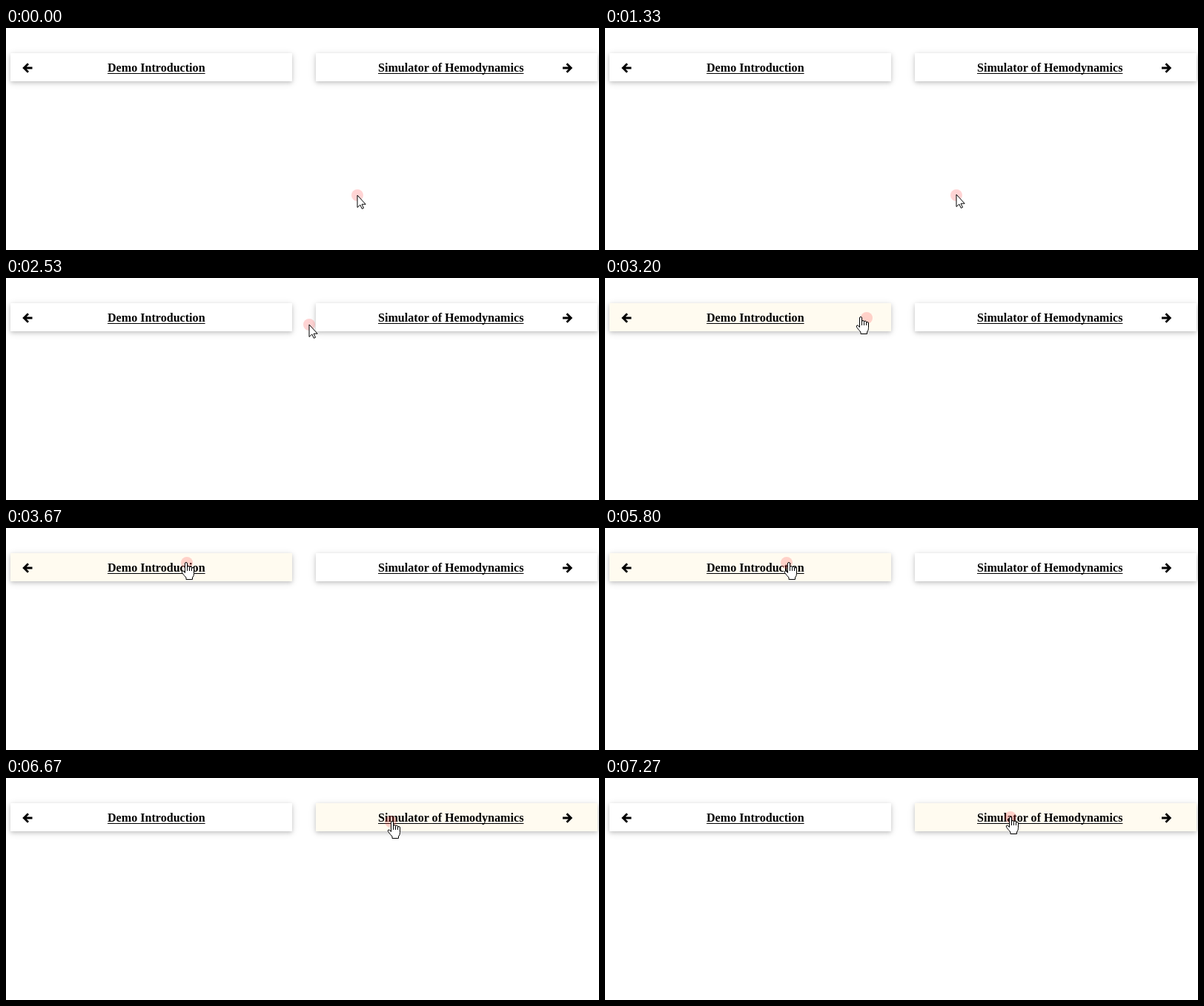
An HTML page that plays this animation: 800 px wide and 300 px high, repeating every 8 s.

```html
<!DOCTYPE html>
<html lang="en">
<head>
<meta charset="utf-8">
<title>Page navigation</title>
<style>
  html, body { margin: 0; width: 100%; height: 100%; overflow: hidden; background: #fff; }
  .card {
    position: absolute; top: 34px; width: 380px; height: 38px;
    background: #fff;
    box-shadow: 0 2px 5px rgba(0,0,0,.16), 0 2px 10px rgba(0,0,0,.12);
  }
  .card.hover { background: #fffbf0; }
  .card span {
    position: absolute; white-space: nowrap;
    font: bold 16.1px/40px "Liberation Serif", serif;
    text-decoration: underline 1px; text-underline-offset: 2px;
    text-decoration-skip-ink: none;
  }
  svg { position: absolute; left: 0; top: 0; }
  .icon { fill: none; stroke: #000; stroke-width: 2.8; }
  .pointer { fill: #fff; stroke: #000; stroke-linejoin: round; }
</style>
</head>
<body>
<div class="card" style="left:6px"><span style="left:131px">Demo Introduction</span></div>
<div class="card" style="left:418px"><span style="left:84px">Simulator of Hemodynamics</span></div>
<svg width="800" height="300">
  <defs><path id="back" d="M30 48.2L24.2 54L30 59.8M25 54H35.5"/></defs>
  <use href="#back" class="icon"/>
  <use href="#back" class="icon" transform="matrix(-1 0 0 1 786.5 0)"/>
  <circle id="halo" r="8" fill="rgba(255,60,60,.22)"/>
  <g id="cursor" class="pointer">
    <path id="arrow" d="M0 0V16.5L3.8 13L6.3 18.3L8.5 17.3L6.1 12.2H11.2Z"/>
    <g id="hand">
      <path d="M-1.5 13.5V1a1.5 1.5 0 0 1 3 0V6a1.5 1.5 0 0 1 3 0V6.6a1.5 1.5 0 0 1 3 0V8a1.5 1.5 0 0 1 3 0V14.5Q10.5 18 8.5 20V22.5H0V20Q-2 18-5.5 13.5Q-6.5 11-4 10.8Z"/>
      <path d="M1.5 6V11M4.5 7V11M7.5 8V11" fill="none"/>
    </g>
  </g>
</svg>
<script>
const LOOP = 8000, STEP = 1000 / 15;
const HALO_LAG = 27, HOVER_LAG = 100;

// time, x, y of the pointer
const path = [
  [0, 474, 226], [1267, 474, 226], [1333, 474, 225], [2133, 412, 80],
  [2533, 409, 63], [2600, 409, 63], [2733, 406.5, 57], [2867, 406.5, 57],
  [3667, 243, 47], [5733, 243, 47], [5800, 248, 47], [6200, 409.5, 51],
  [6600, 516, 59], [7267, 547, 53], [LOOP, 547, 53]
];
const $ = id => document.getElementById(id);
const cards = document.querySelectorAll('.card');

function slope(i, axis) {
  const a = path[i], b = path[i + 1];
  return a && b ? (b[axis] - a[axis]) / (b[0] - a[0]) : 0;
}

// Harmonic mean keeps the curve monotone and stops it at rests
function tangent(i, axis) {
  const a = slope(i - 1, axis), b = slope(i, axis);
  return a * b > 0 ? 2 * a * b / (a + b) : 0;
}

function pointAt(time) {
  const t = Math.max(0, time);
  const i = path.findIndex((p, k) => k === path.length - 2 || t < path[k + 1][0]);
  const a = path[i], b = path[i + 1], span = b[0] - a[0], u = (t - a[0]) / span;
  return [1, 2].map(axis =>
    a[axis] + (b[axis] - a[axis]) * u * u * (3 - 2 * u) +
    span * u * (1 - u) * (tangent(i, axis) * (1 - u) - tangent(i + 1, axis) * u));
}

function cardAt([x, y]) {
  if (y < 34 || y > 72) return -1;
  return x >= 6 && x < 386 ? 0 : x >= 418 && x < 798 ? 1 : -1;
}

function place(el, [x, y]) {
  el.setAttribute('transform', `translate(${Math.round(x)} ${Math.round(y)})`);
}

function draw(now) {
  const t = Math.floor((now % LOOP + 5) / STEP) * STEP;
  const tip = pointAt(t), overCard = cardAt(tip) >= 0;
  const hovered = cardAt(pointAt(t - HOVER_LAG));
  place($('halo'), pointAt(t - HALO_LAG));
  place($('cursor'), tip.map(v => Math.round(v)));
  $('arrow').style.display = overCard ? 'none' : '';
  $('hand').style.display = overCard ? '' : 'none';
  cards.forEach((card, i) => card.classList.toggle('hover', i === hovered));
}

const start = performance.now();
function tick() {
  draw(performance.now() - start);
  requestAnimationFrame(tick);
}
tick();
</script>
</body>
</html>
```
